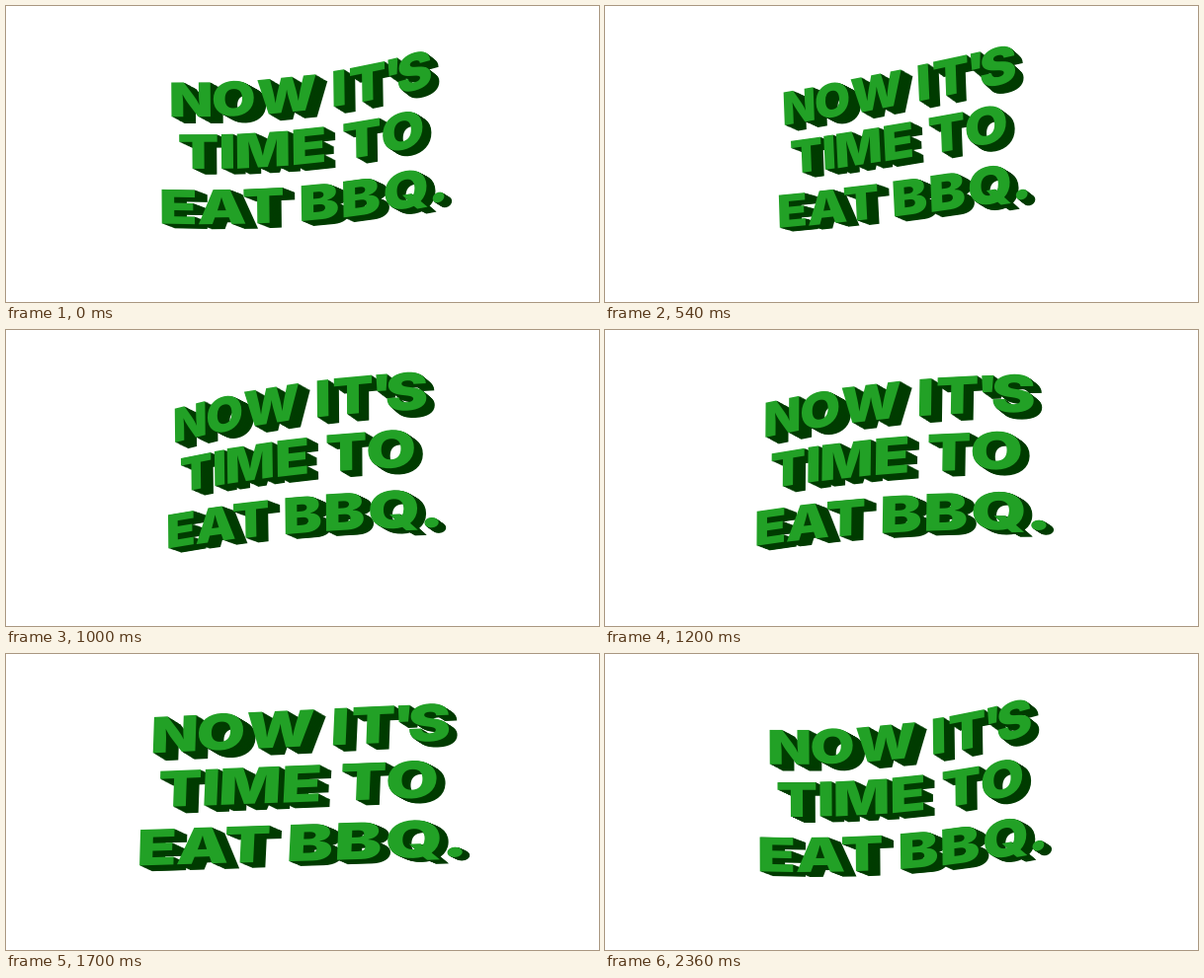
An HTML page for the animation above (2380 ms loop, 600x300 px).

```html
<!DOCTYPE html>
<html lang="en">
<head>
<meta charset="utf-8">
<title>Now it's time to eat BBQ.</title>
<style>
  html, body { margin: 0; width: 100%; height: 100%; overflow: hidden; background: #fff; }
  svg { display: block; width: 100%; height: 100%; }
  text { font: 900 50px Inter, "Liberation Sans", sans-serif; text-anchor: middle; }
  #sides { fill: #003c00; }
  #faces { fill: #22a126; }
</style>
</head>
<body>
<svg viewBox="0 0 600 300" role="img" aria-label="Now it's time to eat BBQ.">
  <g id="sides"></g>
  <g id="faces"></g>
</svg>
<script>
const LOOP = 2380;
const LAYERS = 12;
const MID = 18.2;      // half the cap height

// Each row: letters, baseline, letter centres
const rows = [
  ["NOWIT'S", 97.3, [183.5, 224, 276.5, 330.5, 361, 389, 413]],
  ["TIMETO", 152.6, [190, 217.5, 252, 298, 353.8, 398.5]],
  ["EATBBQ.", 211.2, [171, 212, 252, 308, 351.5, 401.5, 438]]
];

const sides = document.getElementById("sides");
const faces = document.getElementById("faces");

function addText(parent, char) {
  const el = document.createElementNS("http://www.w3.org/2000/svg", "text");
  el.textContent = char;
  parent.appendChild(el);
  return el;
}

const letters = rows.flatMap(([word, base, centres]) =>
  [...word].map((char, i) => ({
    x: centres[i],
    y: base - MID,
    face: addText(faces, char),
    layers: Array.from({ length: LAYERS }, () => addText(sides, char))
  })));

const poly = (w, p, q, r) => p + q * w + r * w * w;
const across = x => (x - 300) / 133;
const down = y => (y - 136) / 57;

// Wide cut of the face, larger toward the near lower right
const expand = (x, y) => 1.2 * (1 + 0.07 * across(x)) * (1 + 0.04 * down(y));

// The waving sheet: flat position to stage position
function bend(x, y, cos, sin) {
  const w = across(x), v = down(y);
  return [
    x + cos * poly(w, 8.1 + 0.7 * v, -1.8 + 0.4 * v, -7.4)
      + sin * poly(w, -3 + 2.7 * v, -16.7 - 0.6 * v, 3.5 - 1.8 * v),
    y + poly(w, 0, -12.5 + 2.6 * v, -1.3)
      + cos * poly(w, 7.2 - v, -1.5, -7 + v)
      + sin * poly(w, 1.5 - v, -6.7 + 1.6 * v, 0)
  ];
}

// Offset from the front to the back of a letter
function depth(x, y, sin) {
  const w = across(x);
  return [poly(w, 11.5, -2.5, -1.2), 5.8 - down(y) + 1.2 * w * sin];
}

function draw(time) {
  const angle = 2 * Math.PI * (time % LOOP) / LOOP;
  const cos = Math.cos(angle), sin = Math.sin(angle);
  for (const { x, y, face, layers } of letters) {
    const [px, py] = bend(x, y, cos, sin);
    const [lx, ly] = bend(x - 10, y, cos, sin);
    const [rx, ry] = bend(x + 10, y, cos, sin);
    const [tx, ty] = bend(x, y - 10, cos, sin);
    const [bx, by] = bend(x, y + 10, cos, sin);
    const wide = expand(x, y) / 20;
    const a = (rx - lx) * wide, b = (ry - ly) * wide;
    const c = (bx - tx) / 20, d = (by - ty) / 20;
    const place = (el, dx, dy) => el.setAttribute("transform",
      `matrix(${[a, b, c, d, px + c * MID + dx, py + d * MID + dy].map(n => n.toFixed(4))})`);
    const [dx, dy] = depth(x, y, sin);
    layers.forEach((el, i) => {
      const f = 1 - i / LAYERS;
      place(el, dx * f, dy * f);
    });
    place(face, 0, 0);
  }
}

function tick(now) {
  draw(now);
  requestAnimationFrame(tick);
}
draw(0);
requestAnimationFrame(tick);
</script>
</body>
</html>
```
